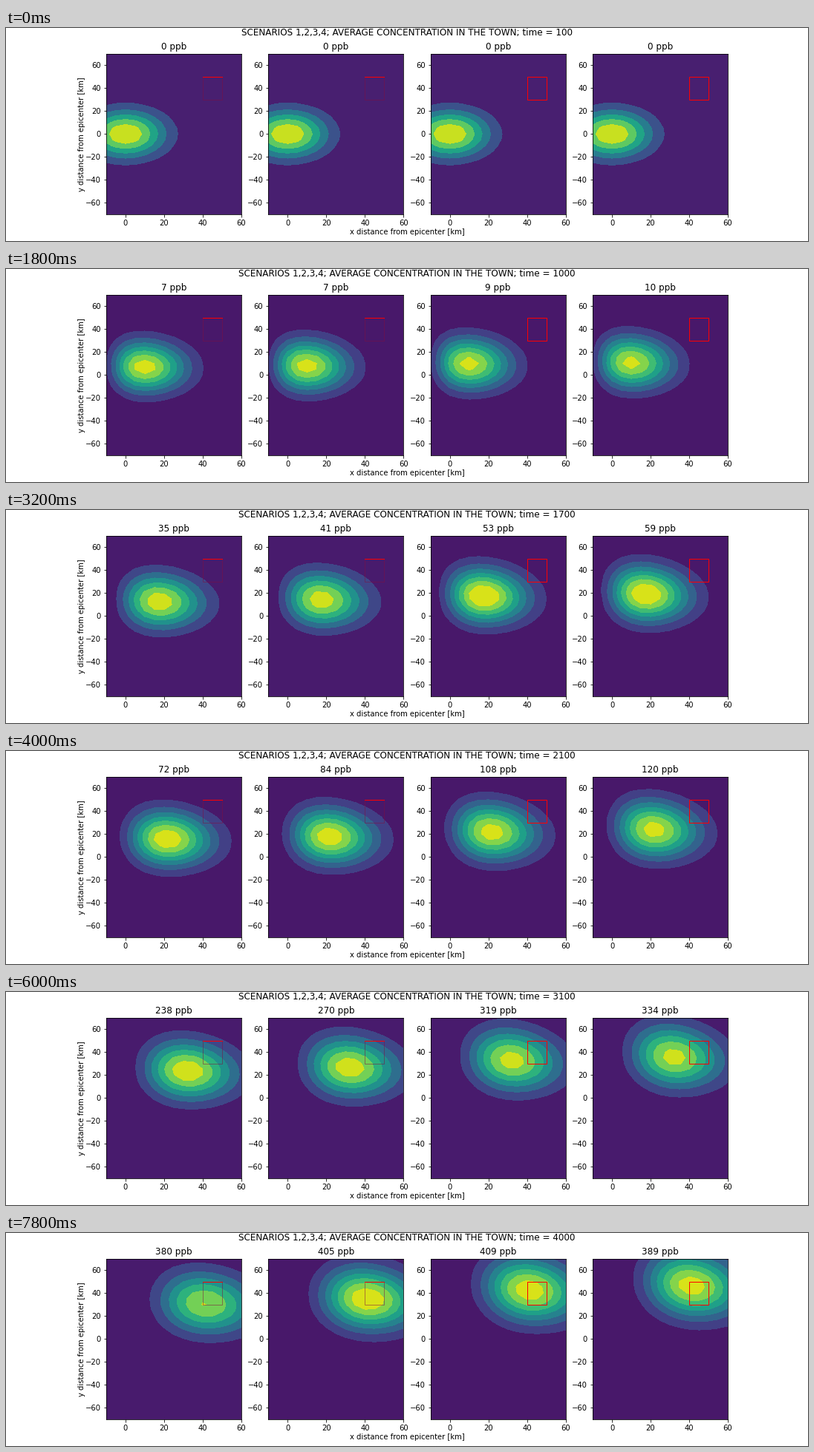
These frames come from a looping animation (1080x288 px, 8 s). A matplotlib script:

```python
import numpy as np
import matplotlib.pyplot as plt
from matplotlib.animation import FuncAnimation
from matplotlib.patches import Rectangle

FRAMES = 40
INTERVAL = 200           # ms
STEP = 5                 # grid spacing, km
DT = 100                 # seconds per frame
PEAK = 900               # initial concentration, ppb
WIND_X = 0.010           # km/s
WINDS_Y = (0.008, 0.009, 0.011, 0.012)

x = np.arange(-10, 61, STEP)
y = np.arange(-70, 71, STEP)
X, Y = np.meshgrid(x, y)
town = (X >= 40) & (X <= 50) & (Y >= 30) & (Y <= 50)


def advect(c, cx, cy):
    """One upwind step with clean air flowing in from the left and below."""
    left = np.pad(c, ((0, 0), (1, 0)))[:, :-1]
    below = np.pad(c, ((1, 0), (0, 0)))[:-1]
    return c - cx * (c - left) - cy * (c - below)


def simulate(wind_y):
    states = [PEAK * np.exp(-(X**2 + Y**2) / 400)]
    while len(states) < FRAMES:
        states.append(advect(states[-1], WIND_X * DT / STEP, wind_y * DT / STEP))
    return states


def draw_town(ax, faint):
    edge = (0.5, 0.06, 0.25, 0.5) if faint else "red"
    ax.add_patch(Rectangle((40, 30), 10, 20, fill=False, ec=edge, lw=1, zorder=2.1))
    if faint:
        ax.plot([40, 50], [50, 50], color="red", lw=1, zorder=2.2)


runs = [simulate(v) for v in WINDS_Y]

plt.rcParams["font.family"] = "DejaVu Sans"
fig, axes = plt.subplots(1, 4, figsize=(15, 4), dpi=72)
fig.subplots_adjust(left=0.125, right=0.9, bottom=0.125, top=0.88, wspace=0.2)
fig.text(0.5, 0.04, "x distance from epicenter [km]", ha="center", va="center")
fig.text(0.0945, 0.5, "y distance from epicenter [km]", ha="center", va="center",
         rotation="vertical")
heading = fig.suptitle("", y=1.0, fontsize=12)

for n, ax in enumerate(axes):
    draw_town(ax, faint=n < 2)
    ax.set_xticks(range(0, 61, 20))
    ax.set_yticks(range(-60, 61, 20))

plumes = []


def update(i):
    while plumes:
        plumes.pop().remove()
    for ax, run in zip(axes, runs):
        c = run[i]
        plumes.append(ax.contourf(X, Y, c, cmap="viridis"))
        ax.set_xlim(-10, 60)
        ax.set_ylim(-70, 70)
        ax.set_title(f"{c[town].mean():.0f} ppb", fontsize=12)
    heading.set_text("SCENARIOS 1,2,3,4; AVERAGE CONCENTRATION IN THE TOWN; "
                     f"time = {(i + 1) * DT}")
    return plumes


def reset():
    return update(0)


anim = FuncAnimation(fig, update, frames=FRAMES, init_func=reset,
                     interval=INTERVAL, repeat=True, repeat_delay=0, blit=False)
plt.show()
```
